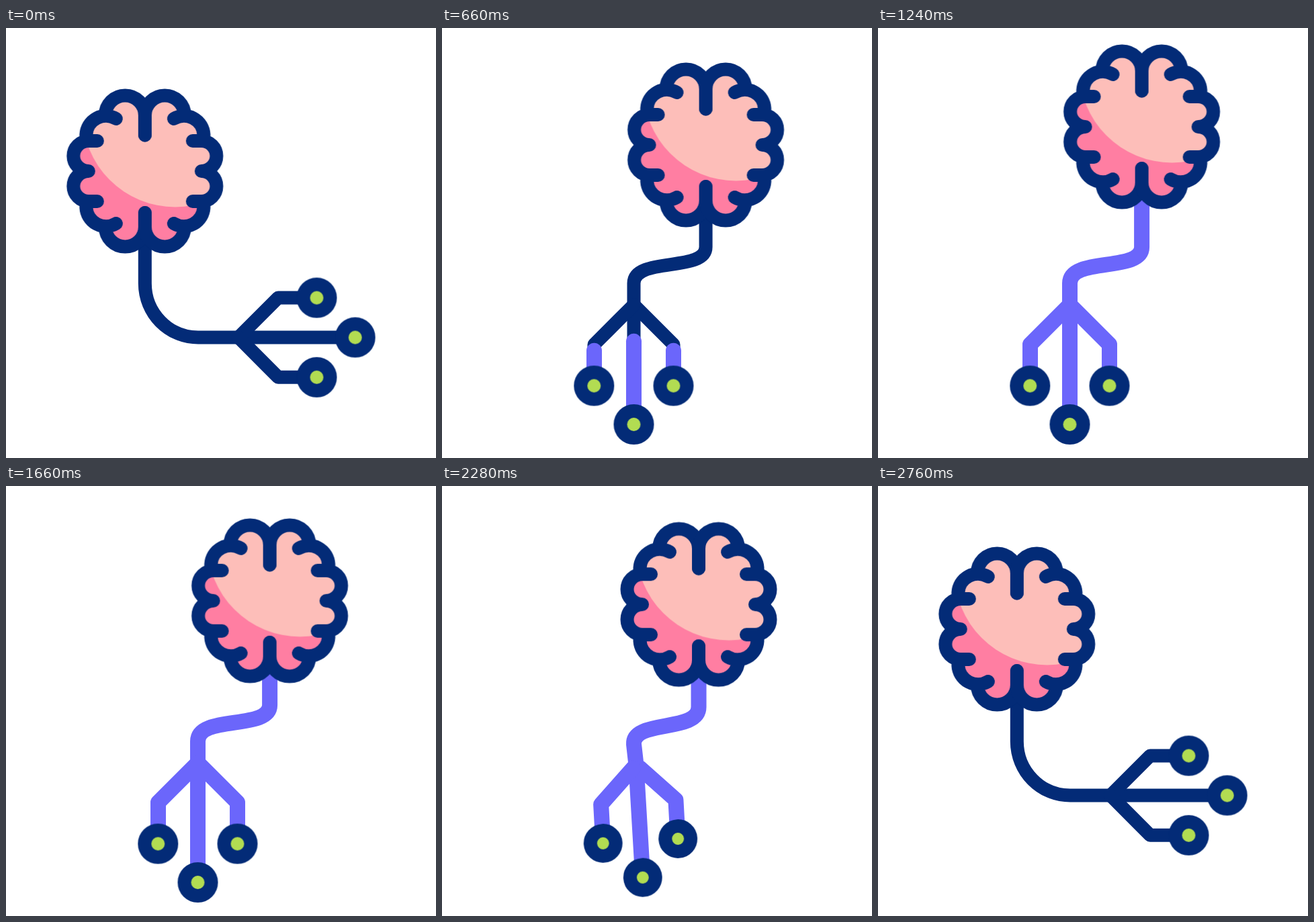
An HTML page without scripts for the animation above (3 s loop, 640 by 640 pixels).

```html
<!DOCTYPE html>
<html lang="en">
<head>
<meta charset="utf-8">
<title>Brain network</title>
<style>
  html, body { margin: 0; width: 100%; height: 100%; overflow: hidden; background: #fff; }
  svg { display: block; width: 100%; height: 100%; }

  .move, .line, .ring, .bob, .pulse {
    animation: 3s cubic-bezier(.333, 0, .667, 1) infinite;
  }
  .line, .outline, .ring { fill: none; stroke: #032b77; stroke-width: 20; stroke-linecap: round; stroke-linejoin: round; }
  .line { animation-name: bend; }
  .pulse .line { stroke: #6b66fb; stroke-width: 23; stroke-dasharray: 1 2; animation-name: bend, fill; }
  .pulse { animation-name: show; animation-timing-function: step-end; }
  .move { animation-name: travel; }
  .bob { animation-name: bob; }
  .ring { fill: #b2dc52; animation-name: turn; }

  /* --a: laid out to the right, --b: hanging below */
  .main {
    --a: path("M500 460.5 L346 460.5 L286 460.5 C242 460.5 206.8 424.4 206.8 380 L206.8 284");
    --b: path("M285.5 570 L285.5 412 L285.5 380 C285.5 340 392.6 364 392.6 326 L392.6 245");
  }
  .upper {
    --a: path("M442.5 401.5 L405 401.5 L346 460.5");
    --b: path("M344.5 512.5 L344.5 471 L285.5 412");
  }
  .lower {
    --a: path("M442.5 519.8 L405 519.8 L346 460.5");
    --b: path("M226.5 512.5 L226.5 471 L285.5 412");
  }
  .brain { --a: translate(206.8px, 213px); --b: translate(392.6px, 174px); }
  .n1 { --a: translate(519.7px, 460.5px); --b: translate(285.5px, 590px); }
  .n2 { --a: translate(462.5px, 401.5px); --b: translate(344.5px, 532.5px); }
  .n3 { --a: translate(462.5px, 519.8px); --b: translate(226.3px, 532.5px); }
  .ring {
    --a: path("M20 0 C20 11 11 20 0 20 S-20 11 -20 0 S-11 -20 0 -20 S20 -11 20 0 Z");
    --b: path("M0 20 C-11 20 -20 11 -20 0 S-11 -20 0 -20 S20 -11 20 0 S11 20 0 20 Z");
  }

  @keyframes bend {
    0%, 92%, 100% { d: var(--a); }
    16.667%, 73.333% { d: var(--b); }
  }
  @keyframes turn {
    0%, 92%, 100% { d: var(--a); }
    16.667%, 73.333% { d: var(--b); }
  }
  @keyframes travel {
    0%, 92%, 100% { transform: var(--a); }
    16.667%, 73.333% { transform: var(--b); }
  }
  @keyframes bob {
    0%, 33.333%, 53.333%, 73.333%, 100% { transform: translateY(0); }
    43.333%, 63.333% { transform: translateY(-30px); }
  }
  @keyframes fill {
    0%, 16.667%, 92%, 100% { stroke-dashoffset: 1; }
    32.8%, 73.333% { stroke-dashoffset: 0; }
  }
  @keyframes show {
    0%, 91.9%, 100% { opacity: 0; }
    17.4% { opacity: 1; }
  }
</style>
</head>
<body>
<svg viewBox="0 0 640 640" xmlns="http://www.w3.org/2000/svg">
  <defs>
    <path id="half" d="M2 -83 H0 A29.5 29.5 0 0 0 -59 -83 A29.5 29.5 0 0 0 -87.5 -54.5 V-45 H-84
      A22.5 22.5 0 0 0 -84 0 A22.5 22.5 0 0 0 -84 45 H-87.5 V54.5
      A29.5 29.5 0 0 0 -59 83 A29.5 29.5 0 0 0 0 83 H2 Z"/>
    <path id="folds" d="M0 -53.5 V-83 A29.5 29.5 0 0 0 -59 -83
      M-43 -78 A29.5 29.5 0 0 0 -87.5 -54.5 V-45
      M-71 -45 H-84 A22.5 22.5 0 0 0 -84 0 A22.5 22.5 0 0 0 -84 45 H-71
      M-43 78 A29.5 29.5 0 0 1 -87.5 54.5 V45
      M-59 83 A29.5 29.5 0 0 0 0 83 V62"/>
    <clipPath id="inside">
      <use href="#half"/>
      <use href="#half" transform="scale(-1 1)"/>
    </clipPath>
  </defs>

  <g>
    <path class="line main"/>
    <path class="line upper"/>
    <path class="line lower"/>
  </g>
  <g class="pulse">
    <path class="line main" pathLength="1"/>
    <path class="line upper" pathLength="1"/>
    <path class="line lower" pathLength="1"/>
  </g>

  <g class="move n1"><path class="ring"/></g>
  <g class="move n2"><path class="ring"/></g>
  <g class="move n3"><path class="ring"/></g>

  <g class="move brain">
    <g class="bob">
      <g fill="#ff7ea2">
        <use href="#half"/>
        <use href="#half" transform="scale(-1 1)"/>
      </g>
      <g clip-path="url(#inside)">
        <circle cx="45" cy="-84.5" r="138" fill="#fdbeb9"/>
      </g>
      <g class="outline">
        <use href="#folds"/>
        <use href="#folds" transform="scale(-1 1)"/>
      </g>
    </g>
  </g>
</svg>
</body>
</html>
```
